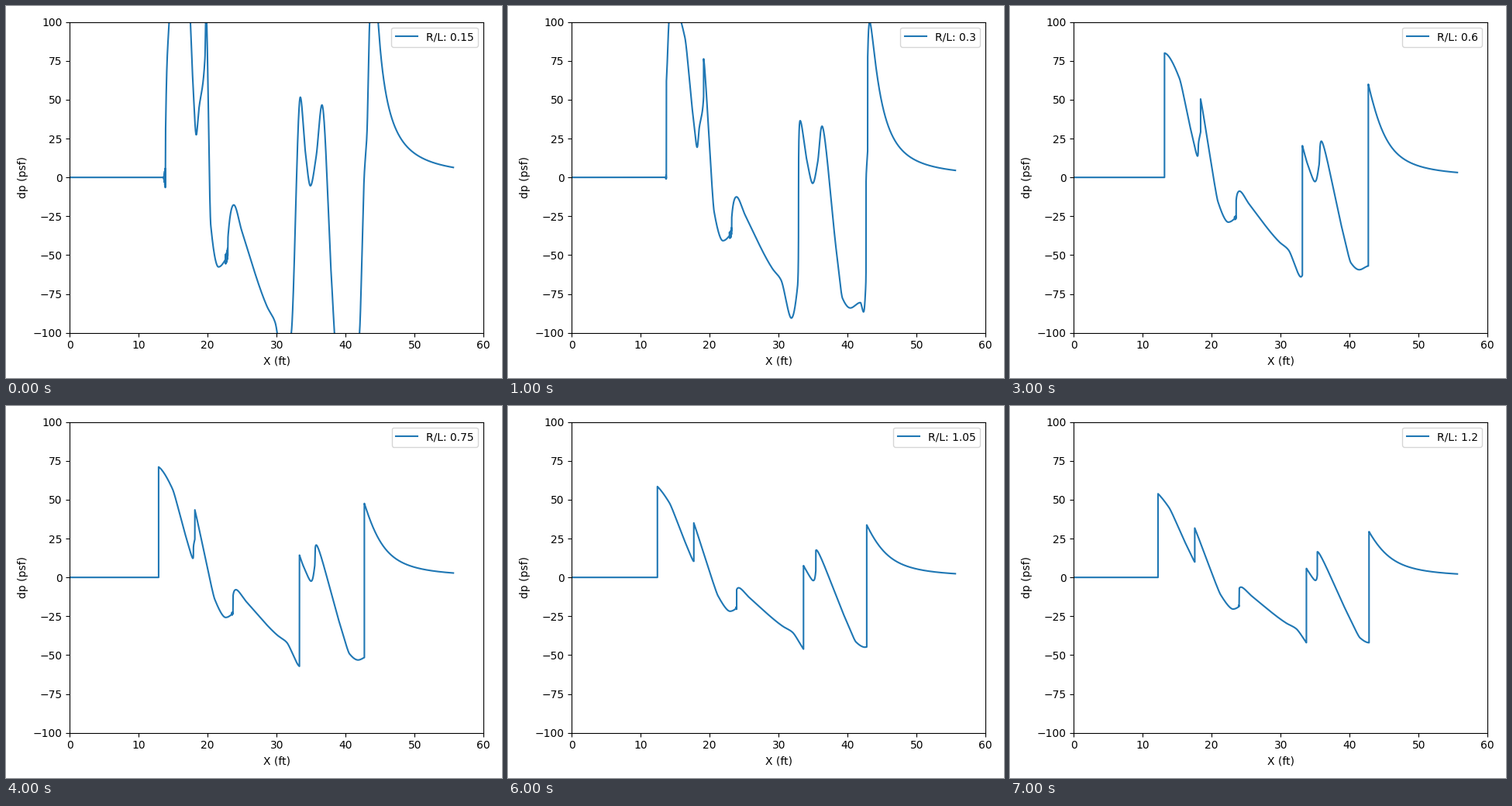
Write a matplotlib script that moves like this. It is 640 px wide and 480 px high and loops after 8000 ms.

```python
import numpy as np
import matplotlib.pyplot as plt
from matplotlib.animation import FuncAnimation

R0 = 0.15           # nearest R/L, also the step between frames
FRAMES = 8
STEEPEN = 0.0373    # shift in ft per psf and sqrt(R/L)
X_TAIL, X_END = 44.72, 55.62

# Peaks, troughs and kinks of the nearest pressure signature (ft, psf)
KEYS = [
    (0, 0), (13.86, 0), (13.88, 25), (14.42, 100), (15.42, 160),
    (17.16, 127.6), (17.87, 60), (18.34, 27.4), (18.7, 43), (19.6, 76.5),
    (19.75, 108), (20.45, -31), (21.57, -57.6), (22.55, -53), (22.9, -48),
    (22.95, -38), (23.78, -17.7), (24.94, -34.4), (28.6, -83),
    (29.78, -93.3), (31.07, -128), (32.13, -100), (33.43, 51.6),
    (34.16, 16.5), (34.89, -5.4), (35.73, 13.5), (36.57, 46.6),
    (37.98, -68), (38.6, -110), (39.68, -118.8), (41.17, -113.9),
    (41.57, -122.4), (42.02, -100), (42.7, 1), (43.09, 28), (43.48, 100),
    (44.05, 141.4), (X_TAIL, 100),
]


def tail(x):
    """Power-law recovery behind the last shock."""
    return 100 * (1 + (x - X_TAIL) / 2.385) ** -1.6


def ripple(x, start, end, amp, cycles, grow=0):
    """Short burst of numerical ringing."""
    u = (x - start) / (end - start)
    wave = amp * np.abs(u) ** grow * np.sin(2 * np.pi * cycles * u)
    return np.where((u > 0) & (u < 1), wave, 0)


def monotone_cubic(points, x):
    """Shape-preserving cubic through the points."""
    px, py = np.array(points, float).T
    h = np.diff(px)
    d = np.diff(py) / h
    m = np.zeros(len(px))
    w1, w2 = 2 * h[1:] + h[:-1], h[1:] + 2 * h[:-1]
    same = d[1:] * d[:-1] > 0
    a, b = np.where(same, d[:-1], 1), np.where(same, d[1:], 1)
    m[1:-1] = np.where(same, (w1 + w2) / (w1 / a + w2 / b), 0)
    i = np.clip(np.searchsorted(px, x) - 1, 0, len(h) - 1)
    t = (x - px[i]) / h[i]
    return (py[i] * (1 + 2 * t) * (1 - t) ** 2
            + py[i + 1] * t ** 2 * (3 - 2 * t)
            + h[i] * (m[i] * t * (1 - t) ** 2 - m[i + 1] * t ** 2 * (1 - t)))


def near_field(x):
    body = monotone_cubic(KEYS + [(46, tail(46))], np.minimum(x, 46))
    wave = np.where(x < X_TAIL, body, tail(np.maximum(x, X_TAIL)))
    return (wave + ripple(x, 13.6, 13.87, 7, 4, grow=1)
            + ripple(x, 22.56, 22.92, 3, 7))


def lower_hull(x, y):
    """Indices of the lower convex hull."""
    xs, ys = x.tolist(), y.tolist()
    keep = []
    for k in range(len(xs)):
        while len(keep) > 1:
            i, j = keep[-2:]
            cross = ((xs[j] - xs[i]) * (ys[k] - ys[i])
                     - (ys[j] - ys[i]) * (xs[k] - xs[i]))
            if cross > 0:
                break
            keep.pop()
        keep.append(k)
    return np.array(keep)


s = np.linspace(0, 56, 11201)
p = near_field(s)
area = np.concatenate([[0], np.cumsum((p[1:] + p[:-1]) / 2 * np.diff(s))])


def signature(r):
    """Weak-shock propagation: shear the wave, cut folds by equal areas."""
    shear = STEEPEN * (np.sqrt(r) - np.sqrt(R0))
    x, y = s - shear * p, p * np.sqrt(R0 / r)
    if shear > 1e-9:
        keep = lower_hull(s, s ** 2 / 2 - shear * area)
        x, y = x[keep], y[keep]
    inside = x <= X_END
    return x[inside], y[inside]


ratios = [R0 * (i + 1) for i in range(FRAMES)]
curves = [signature(r) for r in ratios]

fig, ax = plt.subplots(figsize=(6.4, 4.8), dpi=100)
line, = ax.plot([], [], label="R/L: 0.15")
ax.set(xlim=(0, 60), ylim=(-100, 100), xlabel="X (ft)", ylabel="dp (psf)")
legend = ax.legend(loc="upper right")
fig.tight_layout()
fig.subplots_adjust(top=459.4 / 480)


def update(i):
    line.set_data(*curves[i])
    legend.get_texts()[0].set_text(f"R/L: {ratios[i]:g}")
    return line, legend


anim = FuncAnimation(fig, update, frames=FRAMES, interval=1000,
                     init_func=lambda: update(0), repeat=True)
plt.show()
```
